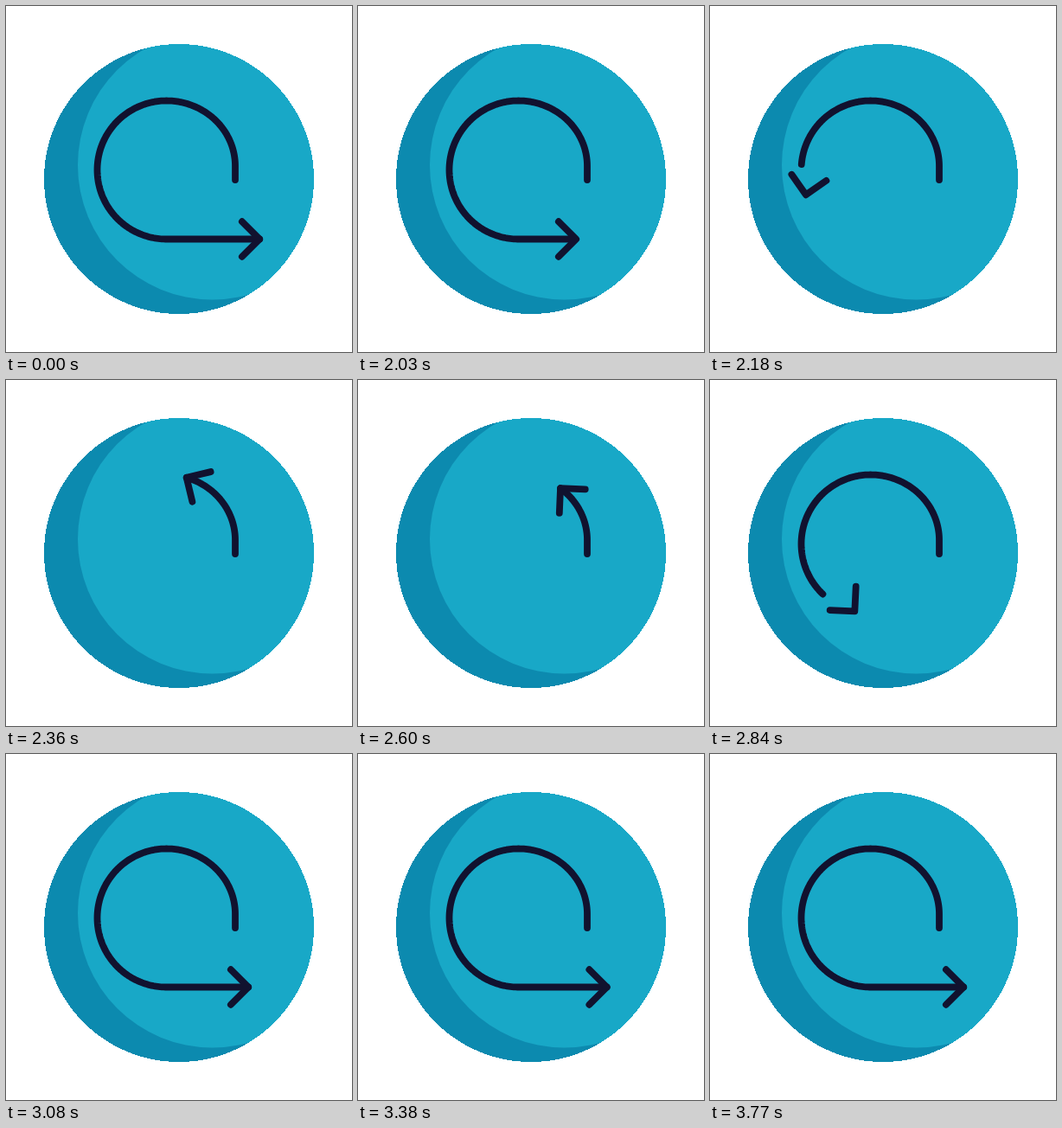
Animation, 400 px wide and 400 px high, one loop 3830 ms. Source, as an HTML page with a canvas:

```html
<!DOCTYPE html>
<html lang="en">
<head>
<meta charset="utf-8">
<title>Looping arrow</title>
<style>
  html, body { margin: 0; width: 100%; height: 100%; overflow: hidden; background: #fff; }
  canvas { display: block; width: 400px; height: 400px; }
</style>
</head>
<body>
<canvas id="stage" width="400" height="400"></canvas>
<script>
const ctx = document.getElementById('stage').getContext('2d');
const LOOP = 3830, START = 2000, STEP = 30;
const DISC = '#0c8aaf', LIGHT = '#18a8c7', INK = '#11122f';

// Arrow travel: [step, distance along the path]
const KEYS = [
  [0, 497], [1, 456], [12, 115], [16, 0], [20, 87],
  [28, 371], [36, 484], [46, 491.5], [54, 495.5], [59, 497]
];

const slope = (a, b) => (b[1] - a[1]) / (b[0] - a[0]);

// Harmonic mean of neighbouring slopes keeps the curve monotone.
const tangents = KEYS.map((k, i) => {
  if (i === 0) return slope(k, KEYS[1]);
  if (i === KEYS.length - 1) return 0;
  const a = slope(KEYS[i - 1], k), b = slope(k, KEYS[i + 1]);
  return a * b <= 0 ? 0 : 2 * a * b / (a + b);
});

function travel(step) {
  let i = 0;
  while (i < KEYS.length - 2 && step >= KEYS[i + 1][0]) i++;
  const [x0, y0] = KEYS[i], [x1, y1] = KEYS[i + 1];
  const w = x1 - x0, u = (step - x0) / w, v = 1 - u;
  return y0 * (1 + 2 * u) * v * v + y1 * u * u * (3 - 2 * u)
    + w * u * v * (tangents[i] * v - tangents[i + 1] * u);
}

// Short stem, rounded turn, half circle, then a straight run to the right.
const STEM = 16, TURN = 122, HALF = Math.PI * 80;

function pointAt(s) {
  if (s < STEM) return [265, 201 - s];
  s -= STEM;
  if (s < TURN) {
    const a = s / TURN * Math.PI / 2;
    return [185.5 + 79.5 * Math.cos(a), 185 - 75.5 * Math.sin(a)];
  }
  s -= TURN;
  if (s < HALF) {
    const a = s / 80;
    return [185.5 - 80 * Math.sin(a), 189.5 - 80 * Math.cos(a)];
  }
  return [185.5 + s - HALF, 269.5];
}

// The line trails behind the arrowhead in the lower part of the turn.
function lag(s) {
  const q = (s - 115) / 345;
  return q > 0 && q < 1 ? 44 * Math.sin(Math.PI * q ** 1.8) : 0;
}

function heading(s) {
  const turn = 270 * Math.min(1, Math.max(0, s) / 440) ** 1.14;
  return (270 - turn) * Math.PI / 180;
}

function drawDisc() {
  ctx.fillStyle = DISC;
  for (let y = 44; y < 356; y++) {
    const dy = y + 0.5 - 200;
    const half = Math.round(Math.sqrt(156 * 156 - dy * dy));
    ctx.fillRect(200 - half, y, 2 * half, 1);
  }
  ctx.globalCompositeOperation = 'source-atop';
  ctx.fillStyle = LIGHT;
  ctx.beginPath();
  ctx.arc(238.5, 184, 155.5, 0, Math.PI * 2);
  ctx.fill();
  ctx.globalCompositeOperation = 'source-over';
}

function drawLine(length) {
  ctx.beginPath();
  ctx.moveTo(265, 201);
  for (let s = 2; s < length; s += 2) ctx.lineTo(...pointAt(s));
  ctx.lineTo(...pointAt(Math.max(0, length)));
  ctx.stroke();
}

function drawHead(s) {
  ctx.save();
  ctx.translate(...pointAt(s));
  ctx.rotate(heading(s));
  ctx.beginPath();
  ctx.moveTo(-20.3, -20.3);
  ctx.lineTo(0, 0);
  ctx.lineTo(-20.3, 20.3);
  ctx.stroke();
  ctx.restore();
}

function draw(now) {
  const t = now % LOOP;
  const step = Math.min(59, Math.max(0, Math.floor((t - START) / STEP)));
  const s = travel(step);
  ctx.clearRect(0, 0, 400, 400);
  drawDisc();
  ctx.strokeStyle = INK;
  ctx.lineWidth = 7.8;
  ctx.lineCap = ctx.lineJoin = 'round';
  drawLine(s - lag(s));
  drawHead(s);
}

let origin;
function tick(now) {
  if (origin === undefined) origin = now;
  draw(Math.max(0, now - origin));
  requestAnimationFrame(tick);
}
draw(0);
requestAnimationFrame(tick);
</script>
</body>
</html>
```
